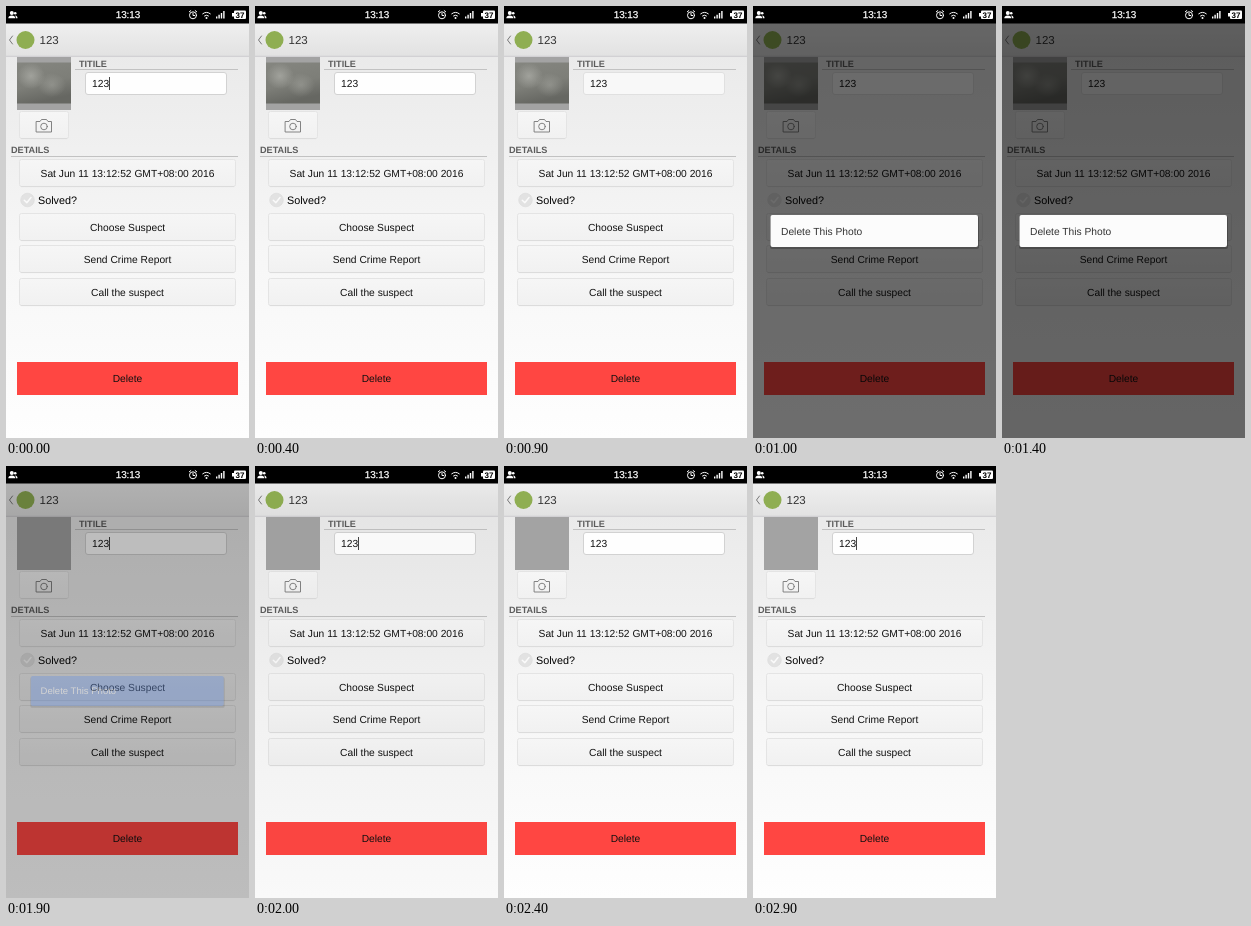
An HTML page that plays this animation: 243 by 432 pixels, repeating every 3.1 s.

```html
<!DOCTYPE html>
<html lang="en">
<head>
<meta charset="utf-8">
<title>Delete photo</title>
<style>
html, body { margin: 0; width: 100%; height: 100%; overflow: hidden; background: #000; }
svg { display: block; width: 100%; height: 100%; }
text { font: 10.25px "Liberation Sans", Arial, sans-serif; fill: #111; text-rendering: geometricPrecision; }
.mid { text-anchor: middle; }
.head { font-size: 9.15px; font-weight: bold; fill: #5c5c5c; }
.status { fill: #fff; font-size: 9.9px; stroke: #fff; stroke-width: .25px; }
.line { fill: none; stroke-linecap: round; stroke-linejoin: round; }
</style>
</head>
<body>
<svg viewBox="0 0 243 432" preserveAspectRatio="none">
  <defs>
    <linearGradient id="page" x2="0" y2="1">
      <stop stop-color="#e7e7e7"/><stop offset=".55" stop-color="#f6f6f6"/><stop offset="1" stop-color="#fefefe"/>
    </linearGradient>
    <linearGradient id="bar" x2="0" y2="1">
      <stop stop-color="#efefef"/><stop offset="1" stop-color="#e2e2e2"/>
    </linearGradient>
    <linearGradient id="key" x2="0" y2="1">
      <stop stop-color="#f6f6f6"/><stop offset="1" stop-color="#f1f1f1"/>
    </linearGradient>
    <linearGradient id="wall" x2=".3" y2="1">
      <stop stop-color="#858680"/><stop offset=".6" stop-color="#7d7e78"/><stop offset="1" stop-color="#666762"/>
    </linearGradient>
    <radialGradient id="glow">
      <stop stop-color="#a9aaa4" stop-opacity=".8"/><stop offset="1" stop-color="#a9aaa4" stop-opacity="0"/>
    </radialGradient>
  </defs>

  <rect width="243" height="432" fill="url(#page)"/>
  <rect y="17" width="243" height="33" fill="url(#bar)"/>
  <path d="M0 50.3H243" stroke="#c6c4c8" stroke-width=".8"/>
  <path class="line" d="M6.5 30L3.5 34L6.5 38" stroke="#777"/>
  <circle cx="19.5" cy="34" r="9" fill="#8fae52"/>
  <text x="33.5" y="38" style="font-size:11.5px;fill:#333">123</text>

  <rect x="11" y="51" width="54" height="53" fill="#a3a3a3"/>
  <g id="photo">
    <rect x="11" y="56.5" width="54" height="41" fill="url(#wall)"/>
    <ellipse cx="25" cy="70" rx="14" ry="13" fill="url(#glow)"/>
    <ellipse cx="46" cy="79" rx="14" ry="12" fill="url(#glow)" opacity=".6"/>
  </g>

  <text class="head" x="73" y="60.5">TITILE</text>
  <path d="M69 63.5H232M5 150.5H232" stroke="#c2c2c2"/>
  <rect id="field" x="79.5" y="66.5" width="141" height="22" rx="2.5"/>
  <text x="86" y="81">123</text>
  <rect id="caret" x="103" y="71" width="1" height="13" fill="#444"/>
  <text class="head" x="5" y="146.9">DETAILS</text>

  <g id="keys"></g>
  <g class="line" stroke="#777" stroke-width=".9">
    <path d="M30.5 115.5H34L35.5 113.5H40.5L42 115.5H45.5V126H30.5Z"/>
    <circle cx="38" cy="120.5" r="3.3"/>
  </g>
  <circle cx="21.5" cy="194" r="6.8" fill="#e2e2e2" stroke="#dadada" stroke-width=".6"/>
  <path class="line" d="M18.3 194.2L20.8 196.7L25 191.5" stroke="#fafafa" stroke-width="1.5"/>
  <text x="32" y="198" style="font-size:10.8px;fill:#000">Solved?</text>
  <rect x="11" y="356" width="221" height="33" fill="#ff4642"/>
  <text class="mid" x="121.5" y="376.2">Delete</text>

  <rect id="dim" y="17" width="243" height="415"/>
  <g id="dialog">
    <rect x="17" y="210" width="209" height="33" rx="2" opacity=".25"/>
    <rect id="sheet" x="17.5" y="209" width="207.5" height="32" rx="2"/>
    <text id="item" x="28" y="228.7">Delete This Photo</text>
  </g>

  <rect width="243" height="17.5" fill="#000"/>
  <g fill="#fff">
    <circle cx="5.8" cy="7" r="2"/><path d="M2.3 12.3Q2.5 9.5 5.8 9.5T9.3 12.3Z"/>
    <circle cx="9.2" cy="7.3" r="1.3"/><path d="M9 9.5Q11.5 9.6 11.5 12.3H9.9Q10 10.6 9 9.5Z"/>
    <path d="M210 12.5V10.5H211.4V12.5ZM212.4 12.5V8.8H213.8V12.5ZM214.8 12.5V7H216.2V12.5ZM217.2 12.5V5H218.6V12.5Z"/>
    <rect x="228" y="4.5" width="12" height="8.5" rx="1"/><rect x="226" y="7" width="2" height="3.5"/>
    <circle cx="200.5" cy="12" r="1"/>
  </g>
  <g class="line" stroke="#fff">
    <circle cx="187" cy="9.3" r="3.5"/><path d="M187 7.2V9.5H188.7M183.3 5.8L184.8 4.6M190.7 5.8L189.2 4.6"/>
    <path d="M198.5 9.9Q200.5 8.3 202.5 9.9M196.7 7.8Q200.5 4.8 204.3 7.8"/>
  </g>
  <text class="mid" x="234" y="11.7" style="font-size:8px;font-weight:bold;fill:#000">37</text>
  <text class="mid status" x="122" y="12.2">13:13</text>
</svg>
<script>
const LOOP = 3100, STEP = 100;
const $ = id => document.getElementById(id);
const set = (id, attrs) => {
  for (const k in attrs) $(id).setAttribute(k, attrs[k]);
};
const show = (id, on) => set(id, { visibility: on ? "visible" : "hidden" });

const key = (x, y, w, label) => `
  <rect x="${x + .5}" y="${y + .5}" width="${w - 1}" height="27" rx="2" fill="url(#key)" stroke="#e4e4e4"/>
  <path d="M${x + 2} ${y + 27.6}H${x + w - 2}" stroke="#d9d9d9" stroke-width=".7"/>
  <text class="mid" x="${x + w / 2}" y="${y + 18}">${label}</text>`;

$("keys").innerHTML = key(13, 105, 50, "") +
  key(13, 153, 217, "Sat Jun 11 13:12:52 GMT+08:00 2016") +
  key(13, 207, 217, "Choose Suspect") +
  key(13, 239, 217, "Send Crime Report") +
  key(13, 272, 217, "Call the suspect");

function dimAt(t) {
  if (t < 1000 || t >= 2100) return 0;
  if (t < 1100) return .57;
  if (t < 1900) return .6;
  return t < 2000 ? .26 : .02;
}

function draw(ms) {
  // the screen refreshes ten times a second
  const t = Math.floor((ms % LOOP) / STEP) * STEP;
  const focused = t < 900 || t >= 1900;
  const blinkOff = (t >= 200 && t < 700) || (t >= 2400 && t < 2900);
  const pressed = t >= 1800, closing = t >= 1900;

  show("photo", t < 1900);
  show("caret", focused && !blinkOff);
  set("field", { fill: focused ? "#fefefe" : "#f8f8f8", stroke: focused ? "#d2d2d2" : "#e0e0e0" });
  set("dim", { opacity: dimAt(t) });

  show("dialog", t >= 1000 && t < 2000);
  const scale = closing ? .93 : 1;
  set("dialog", {
    opacity: closing ? .42 : 1,
    transform: `translate(121.5 225) scale(${scale}) translate(-121.5 -225)`
  });
  set("sheet", { fill: pressed ? "#6f95dd" : "#fcfcfc" });
  $("item").style.fill = pressed ? "#fff" : "#333";
}

function tick() {
  draw(performance.now());
  requestAnimationFrame(tick);
}
tick();
</script>
</body>
</html>
```
